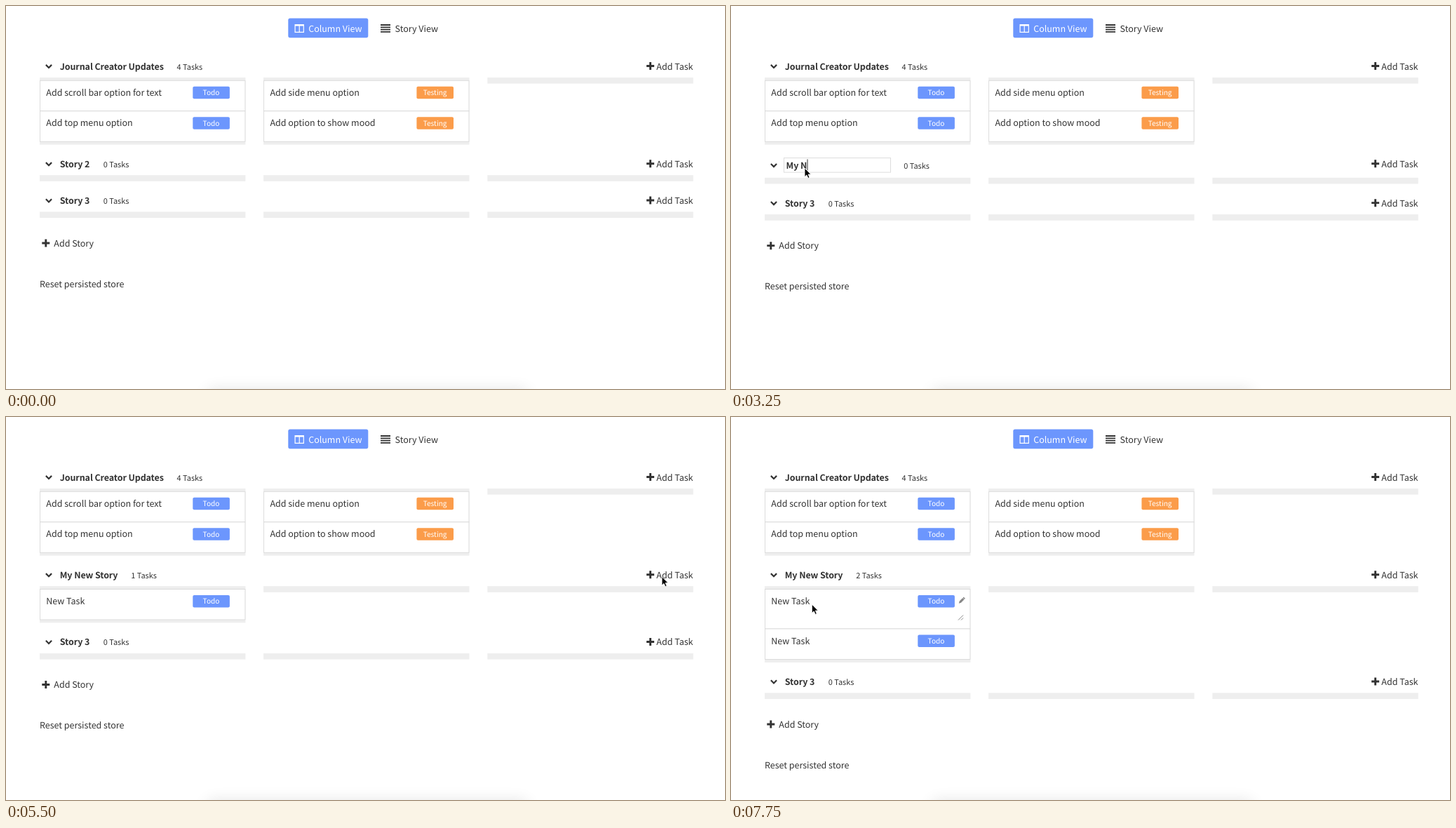
An HTML page for the animation above (8000 ms loop, 1025 by 546 pixels).

```html
<!DOCTYPE html>
<html lang="en">
<head>
<meta charset="utf-8">
<title>Story board</title>
<style>
  html, body { margin: 0; width: 100%; height: 100%; overflow: hidden; background: #fff; }
  svg { display: block; width: 1025px; height: 546px; }
  text {
    font: 12.49px "Noto Sans CJK JP", "Noto Sans CJK SC", "Noto Sans", sans-serif;
    fill: #333; text-rendering: geometricPrecision; white-space: pre;
  }
  .title { font-weight: 600; letter-spacing: -.1px; }
  .count { font-size: 10.93px; }
  .badge { font-size: 10.15px; font-weight: 500; fill: #fff; text-anchor: middle; }
  .white { fill: #fff; }
  .rail { fill: #eee; }
  .card { fill: #fff; stroke: #d9d9d9; stroke-width: .9; }
  .field { fill: none; stroke: #ddd; }
  .icon { fill: none; stroke: #333; }
</style>
</head>
<body>
<svg viewBox="0 0 1025 546">
  <defs>
    <filter id="soft" x="-20%" y="-150%" width="140%" height="400%">
      <feGaussianBlur stdDeviation="11 10"/>
    </filter>
  </defs>
  <rect x="288" y="545" width="454" height="40" opacity=".09" filter="url(#soft)"/>
  <rect x="402.3" y="17.6" width="114" height="27.6" rx="2.6" fill="#6c96fd"/>
  <path d="M411.5 26h13.4v11.9h-13.4zM412.7 28.4v8.3h4.9v-8.3zM418.8 28.4v8.3h4.9v-8.3z" fill="#fff" fill-rule="evenodd"/>
  <text class="white" x="431.2" y="36.7">Column View</text>
  <path class="icon" d="M534 27h14M534 30.3h14M534 33.6h14M534 36.9h14" stroke-width="1.8"/>
  <text x="554.6" y="36.7">Story View</text>
  <g id="board"></g>
  <path id="cursor" d="M0 0V12.6L2.9 9.9L4.9 14.4L7 13.5L5.1 9.1H9Z" fill="#000" stroke="#fff" stroke-width=".9"/>
</svg>
<script>
const LOOP = 8000, CARD = 43.5, PAD = 4.36, EMPTY = 8.7;
const COLS = [48, 367.1, 686.3], COL_W = 293.4;
const BADGES = { Todo: '#6c96fd', Testing: '#fb9c4a' };

// time, changes to the running state
const STEPS = [
  [0, { title: 'Story 2', countX: 138.8, tasks: 0 }],
  [750, { at: [151, 170] }],
  [1000, { at: [137, 186] }],
  [1250, { at: [115, 210] }],
  [1500, { at: [103.5, 233], hover: true }],
  [1750, { at: [105, 231] }],
  [2250, { hover: false, edit: true, countX: 246.3 }],
  [2750, { title: '' }],
  [3000, { title: 'My' }],
  [3250, { title: 'My N' }],
  [3500, { title: 'My New S' }],
  [3750, { title: 'My New Story' }],
  [4000, { edit: false, countX: 178.3 }],
  [4250, { at: [210, 238] }],
  [4500, { at: [470, 246] }],
  [4750, { at: [740, 241] }],
  [5000, { at: [895, 233] }],
  [5250, { at: [927, 230] }],
  [5500, { at: [935, 227.5], tasks: 1 }],
  [6250, { tasks: 2 }],
  [6500, { at: [720, 241] }],
  [6750, { at: [310, 266] }],
  [7000, { at: [121.8, 274] }],
  [7250, { at: [119, 272], open: true }],
  [7500, { at: [117, 269] }],
  [7750, { at: [115.3, 267] }]
];

const board = document.getElementById('board');
const cursor = document.getElementById('cursor');

const text = (x, y, str, cls = '') => `<text class="${cls}" x="${x}" y="${y}">${str}</text>`;
const rect = (x, y, w, h, rest) => `<rect x="${x}" y="${y}" width="${w}" height="${h}" ${rest}/>`;
const plus = (x, y) =>
  `<path class="icon" d="M${x - 5.5} ${y}h11M${x} ${y - 5.5}v11" stroke-width="2.9"/>`;
const chevron = y =>
  `<path class="icon" d="M56.9 ${y - 2.1}l4.1 4.1l4.1 -4.1" stroke-width="2.2"/>`;
const pencil = (x, y) =>
  `<path transform="translate(${x} ${y}) rotate(45)" d="M-1.6 -5.6h3.2v1.5h-3.2zM-1.6 -3.5h3.2v6.3L0 5.6L-1.6 2.8z" fill="#888"/>`;
const grip = (x, y) =>
  `<path class="icon" d="M${x} ${y + 7}l7 -7M${x + 4} ${y + 7}l3 -3" stroke-width=".9" style="stroke:#777"/>`;

function card(x, y, h, [label, badge], hot, open) {
  return rect(x + .5, y, COL_W - 1, h, 'class="card"')
    + text(x + 9.3, y + 21.7, label)
    + rect(x + 218.3, y + 8.5, 52.6, 17.5, `rx="2" fill="${BADGES[badge]}"`)
    + text(x + 244.5, y + 21, badge, 'badge')
    + (hot ? pencil(x + 280.8, y + 16.2) : '')
    + (open ? grip(x + 276, y + 37) : '');
}

function column(x, y, tasks, s) {
  const body = [];
  let top = y + PAD;
  for (const [i, task] of tasks.entries()) {
    const open = s.open && task[0] === 'New Task' && i === 0;
    const h = CARD + (open ? 13 : 0);
    const [cx, cy] = s.at || [0, 0];
    const hot = cx > x && cx < x + COL_W && cy > top && cy < top + h;
    body.push(card(x, top, h, task, hot, open));
    top += h;
  }
  const height = top + PAD - y;
  return { height, svg: rect(x, y, COL_W, height, 'class="rail"') + body.join('') };
}

// Draws one story whose rails start at y; returns its markup and height.
function story(y, title, countX, lists, s, active) {
  const edit = active && s.edit;
  const base = y - 11.4, drop = edit ? 1.9 : 0, shift = edit ? 3.7 : 0;
  const count = lists.flat().length;
  let svg = chevron(base - 4.5 + drop)
    + text(edit ? 78.6 : 76.8, base + drop, title, active ? 'title active' : 'title')
    + text(countX, base + drop, `${count} Tasks`, 'count')
    + plus(918.6, base - 5) + text(927.3, base, 'Add Task');
  if (edit) svg += rect(75.5, y - 24.5, 152, 20.5, 'class="field"') + '<path id="caret" class="icon"/>';
  if (active && s.hover) svg += rect(73.5, y - 26.5, 49, 20.5, 'class="field"');
  let height = EMPTY;
  COLS.forEach((x, i) => {
    const col = column(x, y + shift, lists[i], s);
    svg += col.svg;
    height = Math.max(height, col.height);
  });
  return { svg, height: height + shift };
}

function draw(s) {
  const first = [
    [['Add scroll bar option for text', 'Todo'], ['Add top menu option', 'Todo']],
    [['Add side menu option', 'Testing'], ['Add option to show mood', 'Testing']],
    []
  ];
  const added = Array(s.tasks).fill(['New Task', 'Todo']);
  const rows = [
    ['Journal Creator Updates', 243.6, first],
    [s.title, s.countX, [added, [], []]],
    ['Story 3', 138.8, [[], [], []]]
  ];
  let y = 101.9, svg = '';
  rows.forEach(([title, countX, lists], i) => {
    const part = story(y, title, countX, lists, s, i === 1);
    svg += part.svg;
    y += part.height + 43.5;
  });
  y -= 52.2;
  svg += plus(56.8, y + 44.6) + text(68.3, y + 49.4, 'Add Story')
    + text(48, y + 107.2, 'Reset persisted store');
  board.innerHTML = svg;

  const caret = document.getElementById('caret');
  if (caret) {
    const x = 79.4 + (s.title ? board.querySelector('.active').getComputedTextLength() : 0);
    caret.setAttribute('d', `M${x} 218.5v16`);
  }
  cursor.style.display = s.at ? '' : 'none';
  if (s.at) cursor.setAttribute('transform', `translate(${s.at})`);
}

let shown = -1;
function tick(now) {
  const t = now % LOOP;
  const count = STEPS.filter(([start]) => start <= t).length;
  if (count !== shown) {
    shown = count;
    draw(Object.assign({}, ...STEPS.slice(0, count).map(step => step[1])));
  }
  requestAnimationFrame(tick);
}
tick(performance.now());
</script>
</body>
</html>
```
